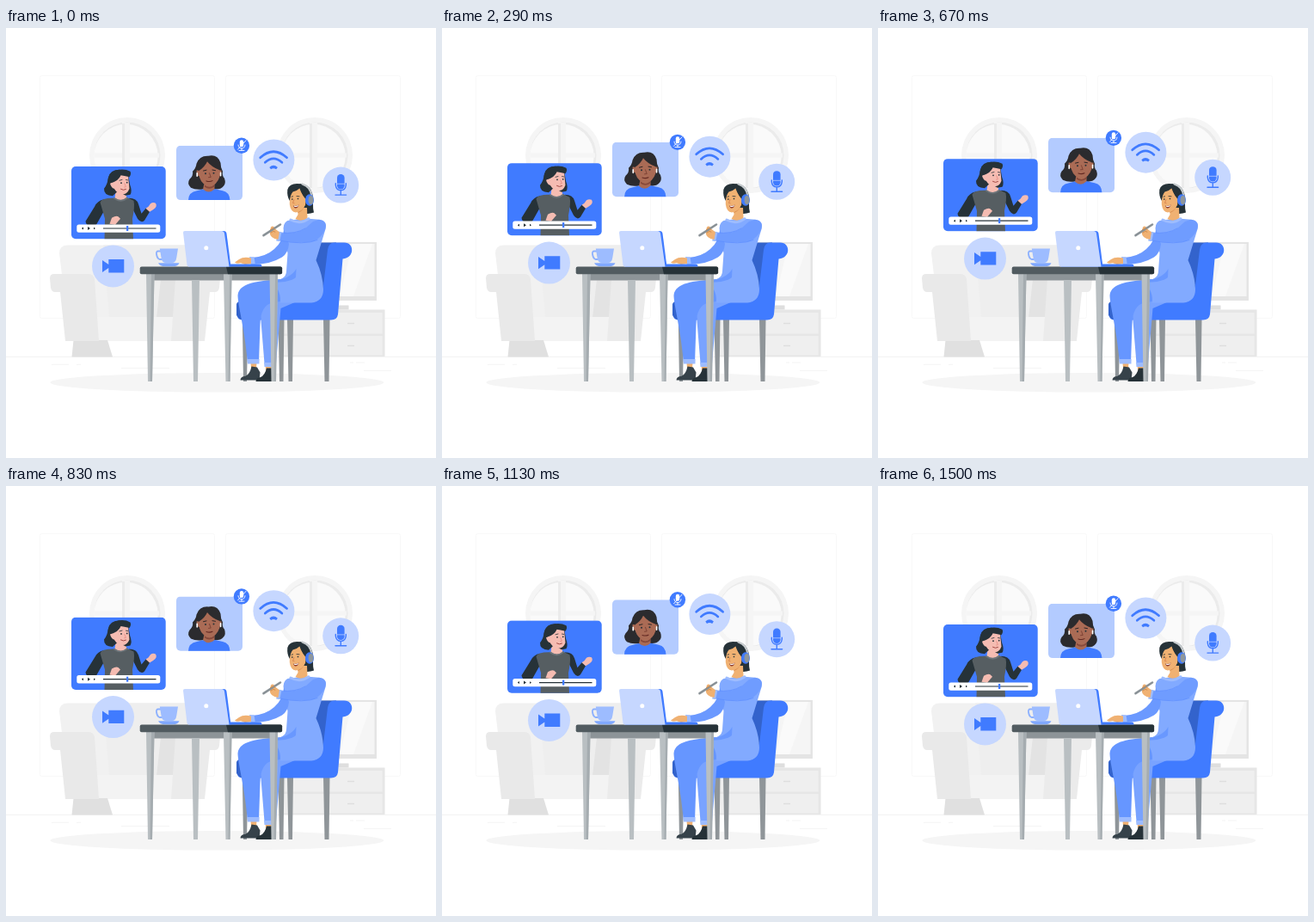
An HTML page that plays this animation: 500x500 px, repeating every 1540 ms.

```html
<!DOCTYPE html>
<html lang="en">
<head>
<meta charset="utf-8">
<title>Video call</title>
<style>
html, body { margin: 0; width: 100%; height: 100%; overflow: hidden; background: #fff; }
svg { display: block; width: 100%; height: 100%; }
.blue { fill: #407bff; }
.pale { fill: #c6d7ff; }
.dark { fill: #263238; }
.white { fill: #fff; }
.skin { fill: #f0b172; }
.pink { fill: #f5bcb2; }
.brown { fill: #aa6b55; }
.line { fill: none; stroke-linecap: round; stroke-linejoin: round; }
</style>
</head>
<body>
<svg viewBox="0 0 500 500">
  <defs>
    <clipPath id="clipA"><rect x="76" y="161.300" width="109.700" height="84.200" rx="5"/></clipPath>
    <clipPath id="clipB"><rect x="198" y="137" width="77" height="63.400" rx="5"/></clipPath>
    <g id="window">
      <circle cx="141" cy="148" r="44" fill="#f5f5f5"/>
      <circle cx="141" cy="148" r="38.500" fill="#ebebeb"/>
      <circle cx="139.500" cy="149" r="37.200" fill="#fafafa"/>
      <path d="M135 110h9v77h-9zM103 145.500h75v5h-75z" fill="#f5f5f5"/>
      <path d="M135 111h3v75h-3z" fill="#ebebeb"/>
    </g>
    <path id="arm" d="M56 286H96q6 0 7 6L108 364H69L63 307H57q-4 0-5-5L51 291q0-5 5-5z"/>
  </defs>

  <!-- Room -->
  <g fill="none" stroke="#f8f8f8">
    <rect x="39.500" y="55.500" width="203" height="282" rx="2"/>
    <rect x="255.500" y="55.500" width="203" height="282" rx="2"/>
  </g>
  <use href="#window"/>
  <use href="#window" x="218"/>
  <path d="M0 382.300H500" stroke="#ebebeb" stroke-width=".7"/>
  <path d="M53 391.300h20M82 391.300h5M134 395.500h56M407 389h10M416 398.300h32M400 389h4" stroke="#f1f1f1" stroke-width=".8"/>
  <ellipse cx="245.300" cy="412.300" rx="194" ry="11.300" fill="#f5f5f5"/>

  <!-- Sofa -->
  <path d="M72 252.500H228q9 0 9 9L230 345H72L62 262q0-9.500 10-9.500z" fill="#f1f1f1"/>
  <path d="M113 252.500L120 336H180L184 292H215L218 252.500z" fill="#eeeeee"/>
  <path d="M180 292H214L210 337H175z" fill="#e3e3e3"/>
  <path d="M104 336H200V364H104z" fill="#f3f3f3"/>
  <path d="M78.500 363H118L124 382.500H76.500z" fill="#e0e0e0"/>
  <use href="#arm" fill="#e9e9e9"/>
  <use href="#arm" fill="#ebebeb" transform="translate(300) scale(-1 1)"/>

  <!-- Television and cabinet -->
  <path d="M350 249H431V317H350z" fill="#e4e4e4"/>
  <path d="M350 251H428.500V312H350z" fill="#f5f5f5"/>
  <path d="M403 251H426L404 312H388z" fill="#fafafa"/>
  <path d="M366 322.500H398.500V327.500H366z" fill="#dedede"/>
  <path d="M322 327.500H440.500V382H322z" fill="#e6e6e6"/>
  <path d="M322 331H437.500V355.500H322zM322 358H437.500V380.500H322z" fill="#efefef"/>
  <path d="M397 343.500h8M397 369.500h8" stroke="#dedede" stroke-width="1.500"/>

  <!-- Chair -->
  <path d="M274.800 338H281.500L280 411H276zM316.500 338H323.500L322.500 411H318zM327 338H334L333 411H328.500zM369 338H376.500L375.500 411H370.500z" fill="#8f9599"/>
  <path d="M361 254q0-4.500 5-4.500H384L376 330H268V323q0-4 5-4.500L355 316z" fill="#3363cc"/>
  <path d="M382 249.500H393.500C405 249.500 406 267 391.500 268.500L386 333Q385 339.500 378 339.500H275Q269 339.500 268 332V325L284 320 355 318Q367 316 368.500 304L374 258Q375 249.500 382 249.500z" class="blue"/>
  <path d="M268 322q0-4 5-4.500H294V339.500H277q-7 0-9-6z" fill="#3363cc"/>

  <!-- Seated woman -->
  <path d="M284 384h8l-1 11h-6zM301 384h8v14h-7z" class="skin"/>
  <path d="M285.500 393.500l6.500 1 3.500 6-1 9H272.500q0-4 6-4.700 5-2 7-11.300z" fill="#36424a"/>
  <path d="M303 395.500H309V411H290.500q0-4 5.500-5 5-2 7-10.500z" class="dark"/>
  <path d="M342 294C317 293 296 297 294 310L300.500 390H314L319.500 326 345 315z" fill="#79a3ff"/>
  <path d="M330 291C299 294 271 294 269.500 311 270 325 277 346 281 389.500H294L295.500 345Q296 322 310 319.500L340 314z" fill="#6696ff"/>
  <path d="M280.500 385h14v5.500h-13.500zM300 389h14v5h-13.500z" fill="#9dbcff"/>
  <path d="M330 223.500Q323 224 322.500 233L327.500 262 326 283Q326 293 307 295C314 300 320 306 319 319.500H355Q369 318 369 304 368.500 287 360.500 270L371.500 234Q373 224 364 222.800L349 221.500z" fill="#82aaff"/>
  <path d="M337.500 280Q331 292 307 295C315 296 330 296 337 290z" fill="#6998ff"/>
  <path d="M323 234Q323 247 312 257 302 266 286 267L288 274.800Q307 275 321 266.500 328 262 329 251z" fill="#6b99ff"/>
  <path d="M283 266l5.500.3 1.300 8.500-5 .6z" fill="#9dbcff"/>
  <path d="M285 267.500Q276 265.500 271 269L266 272.500Q268 274.500 273 273.300L278 275 285 274z" class="skin"/>
  <path d="M364 222.800Q374 224 371.500 233 368 243 358 248 342 251 317 247L319 238Q336 240 347 234L357 225z" fill="#6f9cff"/>
  <path d="M317.500 247Q347 253 362 246.500M319 238Q337 240 348 233" class="line" stroke="#5c8dff" stroke-width=".7"/>
  <path d="M316 236.500l4.500.8-2.300 11-4-.8z" fill="#9dbcff"/>
  <path d="M316.500 246Q307 245 306.500 237L308 231.500Q311 229 312.500 233L318 237.500z" class="skin"/>
  <path d="M299.500 241.200L319 228.500" class="line" stroke="#899196" stroke-width="2.600"/>
  <path d="M307.500 234.500q3-3 5-.8M308 238q3-3 5-1" class="line" stroke="#d08d4f" stroke-width="1"/>
  <path d="M335 183Q345 178.500 352 185 358 191 357 204 356.800 210 358 214.500 350 217.500 342 214L332 200z" class="dark"/>
  <path d="M339 209H350L350.500 221Q344 226 336.500 222L339.500 217z" class="skin"/>
  <path d="M339 210L347 207Q345 213 339.500 215z" fill="#d98e50"/>
  <path d="M331 223Q342 229 352 221.800" class="line" stroke="#9dbcff" stroke-width="3"/>
  <path d="M330 192Q336 189 341 185.500 344 194 349 198.500L348 206Q344 214 337 214.500 331 214 329.800 205z" class="skin"/>
  <path d="M343 181.500Q330 179.500 327.300 188 326.500 196 330 201 330.500 194 333.500 190.500 339 189 342 186 344.500 196 350 200L353 190z" class="dark"/>
  <path d="M334 206.200q3.500 1.300 6.500-.6-1 4-3.500 4-2.200 0-3-3.400z" fill="#8c3d30"/>
  <path d="M334.500 206.500q3 1 5.500-.4l-.6 1.400q-2 .8-4.200.2z" class="white"/>
  <g class="dark"><circle cx="332.800" cy="199" r=".85"/><circle cx="339.500" cy="198.500" r=".85"/></g>
  <path d="M332 196.300l1.600-.5M338 195.600l3 .2" class="line" stroke="#263238" stroke-width=".8"/>
  <path d="M335 199.500l-1.500 4 1.700.3" class="line" stroke="#d57f4d" stroke-width=".8"/>
  <path d="M344.500 181.500Q354.500 184.500 355.500 196" class="line" stroke="#c7ccce" stroke-width="2.200"/>
  <ellipse cx="353" cy="200" rx="5" ry="6.800" class="blue"/>
  <ellipse cx="354.500" cy="200" rx="3" ry="5.300" fill="#8f979c"/>

  <!-- Table -->
  <path d="M165 286H313V293.500H165z" fill="#8d9498"/>
  <path d="M163 286H172.500L170 411H165zM216 293H225L223 411H218zM253 286H262.500L260.500 411H255.500zM306.500 286H316L314 411H308.500z" fill="#b9bfc2"/>
  <path d="M169 286H172.500L170 411H167.500zM260 286H262.500L260.500 411H258.500zM313 286H316L314 411H311.500z" fill="#a5acb0"/>
  <rect x="155.700" y="277.400" width="165.500" height="8.800" rx="2" fill="#515b60"/>
  <path d="M256 277.400H319q2 0 2 2v4.800q0 2-2 2H258z" class="dark"/>

  <!-- Laptop and cup -->
  <path d="M208 236H253q3 0 3.500 3L261.500 277.400H213z" class="blue"/>
  <path d="M260 274.500H295q2.500 0 2.500 2.900H260z" class="blue"/>
  <path d="M208 236H250.500q3 0 3.500 3L259.500 277.400H212.500q-1.800 0-2-2L206 238q-.2-2 2-2z" class="pale"/>
  <circle cx="232.800" cy="255.800" r="2.500" class="white"/>
  <path d="M181 259.500h-4q-2.500 0-2 3.500.8 5 3.500 6h4" class="line" stroke="#8cb0ff" stroke-width="1.800"/>
  <path d="M178.800 256.600H200L198.300 267Q197.500 273 193 273H186Q181.500 273 180.700 268z" fill="#9dbcff"/>
  <path d="M177 273.300H201.500Q200 277.300 194 277.300H185Q179 277.300 177 273.300z" fill="#80a8ff"/>

  <g id="float">
    <!-- Player -->
    <g clip-path="url(#clipA)">
      <path d="M76 161H186V246H76z" class="blue"/>
      <path d="M114 199.500Q106 201 103 208L92.500 225Q93 230 98 230L105 229 114 213z" class="dark"/>
      <path d="M143 198Q152 198 154 205L157.500 216 163 209.500 167 214 161 224Q157 228 153 222L147 210z" class="dark"/>
      <path d="M162.500 210L165.500 208 168 204.500Q171 202.500 174 204 176.500 208 171 211.500L167 214z" class="pink"/>
      <path d="M124 198Q111 198 109.500 203L115 222 114.500 246H148L147 222Q150 208 148.500 201L141 197.500z" fill="#565e62"/>
      <path d="M120.500 228L123 221Q128 218 130.500 219.500L133 222 127 229z" class="pink"/>
      <path d="M128 187H139.500L140 198Q134 203 126.500 198z" class="pink"/>
      <path d="M126 198.300Q134 204 141 197.800" class="line" stroke="#6d757a" stroke-width="1.800"/>
      <path d="M119 174Q121 165 132 165L142 170 144 182Q147 190 144.500 194L139 195 130 190 124 195.500Q113.500 195 114 187 118 182 119 174z" class="dark"/>
      <path d="M124 178Q131 176 134 170.500L142 172 143.500 187Q141 194 134.500 193.500 127 192 124.500 184z" class="pink"/>
      <path d="M121 181q3-3 5.500 0v6q-4 0-5.500-6z" class="pink"/>
      <path d="M118 181Q118 169 127 166 137 163 144.500 167 146 170 143.500 173.500 137 172 133.500 171.500 131 178 122 180.500z" class="dark"/>
      <g class="dark"><circle cx="134" cy="180.500" r=".9"/><circle cx="140.700" cy="180" r=".9"/></g>
      <path d="M132 177.500l3-.8M139.500 176.800l2.300.4" class="line" stroke="#263238" stroke-width=".8"/>
      <path d="M137.800 181l1.600 4-1.800.4" class="line" stroke="#e58a80" stroke-width=".8"/>
      <path d="M133.500 187.600q3 2 6 .2" class="line" stroke="#a34a45" stroke-width="1"/>
      <rect x="82.300" y="228.700" width="97" height="9.300" rx="2.500" class="white"/>
      <path d="M90 231.800v3l-2.200-1.500zM95 231.300v4l3-2zM102 232v2.600l2-1.300z" class="dark"/>
      <path d="M113 233.300H174.500" stroke="#263238" stroke-width="1.200"/>
      <rect x="140" y="230.300" width="2.300" height="6" class="blue"/>
    </g>

    <!-- Muted guest -->
    <g clip-path="url(#clipB)">
      <path d="M198 137H275V201H198z" fill="#b3cbff"/>
      <path d="M235 149Q246 146.500 249.500 157 249.500 163 252 167 251 172 254 175 256 181 253 184 249 189 240 187.500H230Q221 189 215 186 210 181 213.500 176 218 172 217 167 221 163 221.500 158 225 148.500 235 149z" fill="#2b2b2e"/>
      <path d="M212 201Q212 191 222 189.500L230 187.500H243L252 189.500Q260 191 260.500 201z" class="blue"/>
      <path d="M230.500 181H242.500V187.500Q236 194 229 187.800z" class="brown"/>
      <path d="M231 183Q237 187.500 242 182.500V185Q236 189 231 185z" fill="#87493b"/>
      <path d="M224.500 166Q231 162 234 155.500 239 162 248.500 165.500V173Q245 183.500 237 184.300 228 183 225 174z" class="brown"/>
      <path d="M221.500 166q3-1 4 2v5q-4-1-4-7zM250.500 166q-3-1-4 2v5q4-1 4-7z" class="brown"/>
      <g class="dark"><circle cx="232" cy="169.500" r="1"/><circle cx="241.500" cy="169" r="1"/></g>
      <path d="M229.500 166.300l3.500-.8M240 165.300l3.500.6" class="line" stroke="#2d2526" stroke-width="1"/>
      <path d="M236.500 169l1.700 4.700-2.700.3" class="line" stroke="#74392e" stroke-width=".8"/>
      <path d="M233 178.200q4 1.300 7-.3" class="line" stroke="#632922" stroke-width="1.100"/>
      <path d="M222.200 169v3.500M249.600 168.500v3.500" class="line" stroke="#fff" stroke-width="1.600"/>
    </g>
    <circle cx="273.900" cy="137" r="9.200" class="blue"/>
    <rect x="271.800" y="130.500" width="4.400" height="8" rx="2.200" class="white"/>
    <path d="M270 136.300q.5 4 4 4t4-4M274 140.300v2.300M271 142.700h6M269.500 141.500L279 131" class="line" stroke="#fff" stroke-width=".9"/>

    <!-- Wi-Fi -->
    <circle cx="311.400" cy="153.800" r="24" class="pale"/>
    <path d="M295.700 151Q311 137 326.600 151M301.300 156.600Q311 147.600 320.900 156.600" class="line" stroke="#407bff" stroke-width="2.700"/>
    <path d="M306.300 162.300Q311 157.800 315.900 162.300L314.200 164.600Q311 162.600 308 164.600z" class="blue"/>

    <!-- Camera -->
    <circle cx="124.500" cy="277.200" r="24.500" class="pale"/>
    <path d="M119.300 269.300H137.300V284.700H119.300V279.300L112 284.300V270.200L119.300 275.200z" class="blue"/>

    <!-- Microphone -->
    <circle cx="389.200" cy="182.900" r="21" class="pale"/>
    <rect x="385" y="170.300" width="8.600" height="17.400" rx="4.200" class="blue"/>
    <path d="M383.300 181v2q.7 6 6 6t6-6v-2M389.300 189v5M383 194.400h12.600" class="line" stroke="#407bff" stroke-width="1.400"/>
    <path d="M384.500 181.500h9.600" stroke="#c6d7ff" stroke-width=".7"/>
  </g>
</svg>
<script>
const LOOP = 1540, STEP = 1000 / 24, HALF = 18, RISE = 10;
const float = document.getElementById('float');

// Linear rise and fall, sampled at 24 steps a second.
function draw(now) {
  const step = Math.min(36, Math.floor((now % LOOP + 4) / STEP));
  const phase = (step + 0.5) % (2 * HALF) / HALF;
  const y = -RISE * (1 - Math.abs(1 - phase));
  float.setAttribute('transform', `translate(0 ${y.toFixed(3)})`);
}

const start = performance.now();
function tick() {
  draw(performance.now() - start);
  requestAnimationFrame(tick);
}
tick();
</script>
</body>
</html>
```
